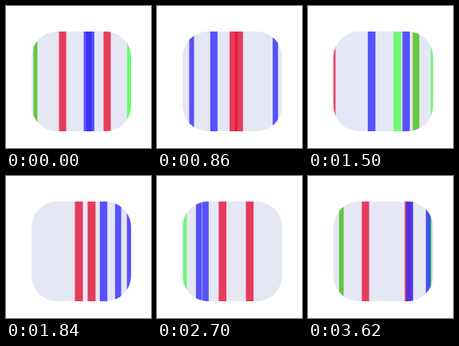
Write an HTML page with a canvas that moves like this. It is 182 px wide and 178 px high and loops after 3640 ms.

```html
<!DOCTYPE html>
<html lang="en">
<head>
<meta charset="utf-8">
<title>Spinning stripes</title>
<style>
  html, body { margin: 0; width: 100%; height: 100%; overflow: hidden; background: #fff; }
  canvas { display: block; }
</style>
</head>
<body>
<canvas id="stage" width="182" height="178"></canvas>
<script>
const ctx = document.getElementById('stage').getContext('2d');
const LOOP = 3640;
const CENTER = 94.5, RADIUS = 76, STRIPE = 10;
const TILE = { x: 32, y: 32, size: 125, corner: 32 };

const RED = 'rgb(230 18 54 / .8)';
const BLUE = 'rgb(50 44 252 / .8)';
const LIME = 'rgb(82 255 82 / .8)';
const GREEN = 'rgb(70 192 20 / .8)';

// Two see-through drums turning in opposite directions; speed in degrees per ms
const drums = [
  { speed: 0.1872, stripes: [[RED, 21.4], [RED, 201.4], [LIME, 130.8], [LIME, 88.7], [BLUE, 177.5], [BLUE, 64.2]] },
  { speed: -0.3755, stripes: [[BLUE, 5.2], [GREEN, -127.3]] }
];

// Stripes narrow toward the rim while keeping their left edge on the drum
function drawStripe(color, degrees) {
  const angle = degrees * Math.PI / 180;
  const width = STRIPE * Math.abs(Math.cos(angle)) ** 1.4;
  ctx.fillStyle = color;
  ctx.fillRect(CENTER + RADIUS * Math.sin(angle), TILE.y, width, TILE.size);
}

function draw(time) {
  ctx.clearRect(0, 0, 182, 178);
  ctx.save();
  ctx.beginPath();
  ctx.roundRect(TILE.x, TILE.y, TILE.size, TILE.size, TILE.corner);
  ctx.clip();
  ctx.fillStyle = '#e5e7f5';
  ctx.fillRect(TILE.x, TILE.y, TILE.size, TILE.size);
  for (const { speed, stripes } of drums)
    for (const [color, start] of stripes) drawStripe(color, start + speed * time);
  ctx.restore();
}

const begin = performance.now();
function tick() {
  draw((performance.now() - begin) % LOOP);
  requestAnimationFrame(tick);
}
tick();
</script>
</body>
</html>
```
